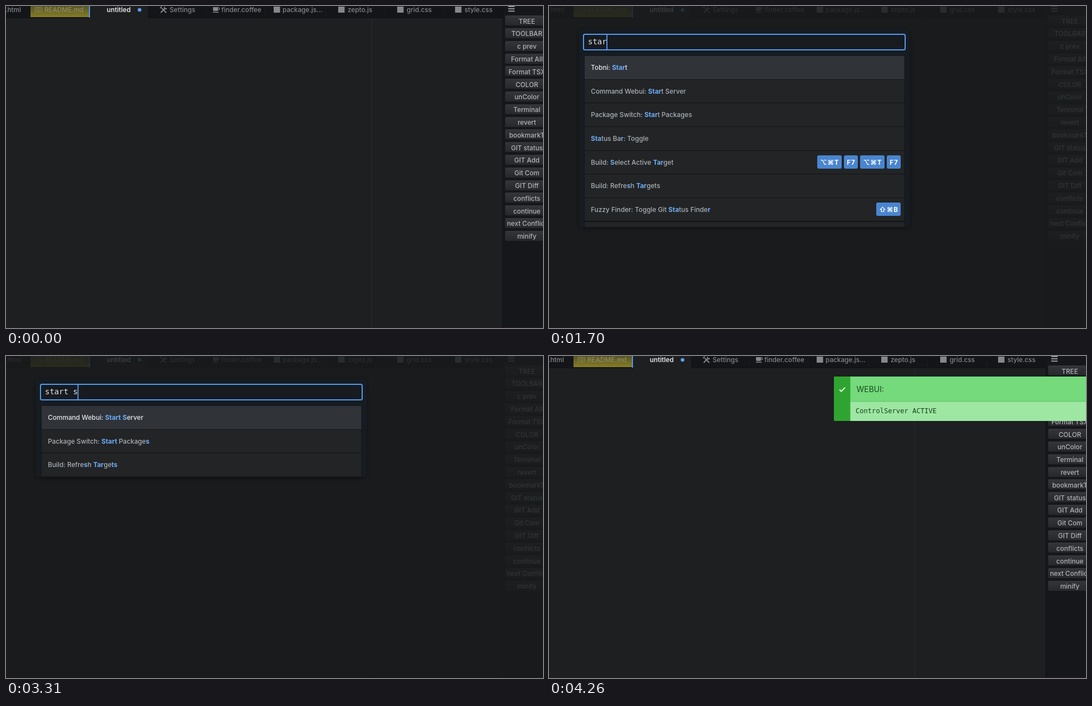
An HTML page that plays this animation: 965x580 px, repeating every 4890 ms.

```html
<!DOCTYPE html>
<html lang="en">
<head>
<meta charset="utf-8">
<title>Command palette</title>
<style>
  html, body { margin: 0; width: 100%; height: 100%; overflow: hidden; background: #1d1f21; }
  svg { position: absolute; display: block; }
  text { font: 500 11.75px Inter, "DejaVu Sans", sans-serif; white-space: pre; }
  #stage { position: relative; width: 100%; height: 100%; overflow: hidden; contain: strict; }
  #window { left: 0; top: 0; }
  #note { left: 512px; top: 37px; }
  .hit { font-weight: 700; fill: #6cadf8; }
  .key { font-weight: 700; letter-spacing: 1px; fill: #fff; }
  .query { font: 500 14px "DejaVu Sans Mono", monospace; fill: #e2e4e8; }
  .title { font: 400 14px Inter, sans-serif; fill: #1d4a21; }
  .body { font: 400 12.1px "DejaVu Sans Mono", monospace; fill: #1b3d1f; }
</style>
</head>
<body>
<div id="stage">
<svg id="window" width="965" height="580" viewBox="0 0 965 580">
  <defs>
    <linearGradient id="olive" x2="0" y2="1">
      <stop stop-color="#585424"/><stop offset="1" stop-color="#857d26"/>
    </linearGradient>
    <linearGradient id="button" x2="0" y2="1">
      <stop stop-color="#34363a"/><stop offset="1" stop-color="#26282b"/>
    </linearGradient>
    <filter id="shadow" x="-5%" y="-10%" width="110%" height="125%">
      <feDropShadow dx="0" dy="2" stdDeviation="4" flood-color="#000" flood-opacity=".4"/>
    </filter>
  </defs>
  <g id="editor"></g>
  <rect id="dim" width="965" height="580" fill="#191b1c"/>
  <g id="palette"></g>
</svg>
<svg id="note" width="463" height="80" viewBox="0 0 463 80">
  <clipPath id="round"><rect width="463" height="80" rx="3"/></clipPath>
  <g clip-path="url(#round)">
    <rect width="463" height="80" fill="#9de7a3"/>
    <rect width="463" height="45" fill="#74da7b"/>
    <rect y="44.5" width="463" height="1" fill="#66c46c"/>
    <rect width="29.5" height="80" fill="#30a430"/>
  </g>
  <path d="M10 23.5l3.3 3.3 6.7-7" fill="none" stroke="#d3f5d5" stroke-width="2"/>
  <text class="title" x="40.5" y="27.5">WEBUI:</text>
  <text class="body" x="39" y="66">ControlServer ACTIVE</text>
</svg>
</div>
<script>
const LOOP = 4890;
const $ = id => document.getElementById(id);

const rect = (x, y, w, h, fill, extra = '') =>
  `<rect x="${x}" y="${y}" width="${w}" height="${h}" fill="${fill}" ${extra}/>`;
const text = (x, y, str, attrs) => `<text x="${x}" y="${y}" ${attrs}>${str}</text>`;

// ---- editor window ----

const GREY = '#85878b';
const tabs = [
  [294, 'Settings'], [387, 'finder.coffee'], [497, 'package.js...'],
  [614, 'zepto.js'], [720, 'grid.css'], [824, 'style.css']
];
const buttons = ['TREE', 'TOOLBAR', 'c prev', 'Format All', 'Format TSX', 'COLOR',
  'unColor', 'Terminal', 'revert', 'bookmarkT', 'GIT status', 'GIT Add', 'Git Com',
  'GIT Diff', 'conflicts', 'continue', 'next Conflict', 'minify'];

function tabBar() {
  const fill = `fill="${GREY}"`;
  const line = (d, w, color = GREY) =>
    `<path d="${d}" fill="none" stroke="${color}" stroke-width="${w}"/>`;
  let out = rect(0, 0, 893, 22, '#141518') + rect(0, 21, 893, 1, '#111214');
  for (const x of [360, 465, 574, 680, 786]) out += rect(x, 0, 1, 21, '#1a1b1e');
  out += rect(44, 0, 105, 20, 'url(#olive)');
  out += rect(151, 0, 104, 22, '#1d1f21') + rect(149, 0, 2, 21, '#4f97f2');
  out += text(27, 10.8, '.html', `${fill} text-anchor="end"`);
  out += text(69, 10.8, 'README.md', 'fill="#8c8a6a"');
  out += text(181, 10.8, 'untitled', 'fill="#e4e6ea" style="font-weight:600"');
  out += '<circle cx="240" cy="7" r="3.3" fill="#5a9ff0"/>';
  for (const [x, name] of tabs) out += text(x, 10.8, name, fill);
  // book, tools, cup
  out += line('M52.5 2.5h12v8h-12zM58.5 2.5v9.5M54 5h3M54 7.5h3M60 5h3M60 7.5h3', 1, '#85825c');
  out += line('M280 4L288 12', 2) + line('M278 12L286 4', 2);
  out += line('M277 4l3-3M285 1.5v3.5h4', 1.8);
  out += `<path d="M372 2h9v5q0 2-2 2h-5q-2 0-2-2zM371 10.5h12l-1.5 1.5h-9z" ${fill}/>`;
  out += line('M381 3.2h1q1.7 0 1.7 1.7t-1.7 1.7h-1', 1.2);
  for (const x of [481, 597, 703, 807]) out += rect(x, 1, 11.5, 11, GREY);
  return out;
}

function sidebar() {
  let out = rect(893, 0, 72, 580, '#16171a') + rect(892, 0, 1, 580, '#121315');
  for (const y of [0, 4.2, 8.4]) out += rect(902.5, y, 11.5, 1.7, '#adafb3');
  buttons.forEach((name, i) => {
    const y = 17.2 + 22.8 * i;
    out += rect(897, Math.round(y), 78, 18, 'url(#button)', 'rx="2"');
    out += text(936, y + 14.3, name, 'fill="#b2b4b8" text-anchor="middle"');
  });
  return out;
}

$('editor').innerHTML = rect(0, 0, 965, 580, '#1d1f21') + rect(656.5, 22, 1, 558, '#2b2d30') +
  tabBar() + sidebar() + rect(0, 579, 965, 1, '#2a191b');

// ---- palette ----

const TOP = 90, ROW = 42.63, FULL = 308, CHAR = 8.43;
const rowTop = i => Math.round(TOP + ROW * i);

// Square brackets mark matched letters; keys follow the bar.
const idle = ['About: Clear Update State', 'About: View Release Notes',
  'Activate Power Mode: Disable', 'Activate Power Mode: Enable',
  'Activate Power Mode: Toggle|⌃⌥O', 'Application: About',
  'Application: Add Project Folder|⇧⌘O'];
const found = ['Tobni: [Start]', 'Command Webui: [Start] [Se]rver',
  'Package Switch: [Start] Package[s]', '[Sta]tus Ba[r]: [T]oggle',
  'Build: [S]elect Active [Tar]ge[t]|⌥⌘T F7 ⌥⌘T F7', 'Build: Refre[s]h [Tar]ge[ts]'];
const statusFinder = 'Fuzzy Finder: Toggle Git [Sta]tus Finde[r]|⇧⌘B';
const declaration = '[S]ymbols View: Go [T]o Decl[ar]a[t]ion|⌥⌘↓';

function results(query) {
  if (!query) return idle;
  if (query === 'start se') return [found[1]];
  if (query === 'start s') return [found[1], found[2], found[5]];
  return [...found, query.startsWith('start') ? declaration : statusFinder];
}

// Highlights only as many marked letters as have been typed.
function highlight(label, count) {
  return label.replace(/\[(.*?)\]/g, (_, run) => {
    const on = run.slice(0, count);
    count -= on.length;
    return (on && `<tspan class="hit">${on}</tspan>`) + run.slice(on.length);
  });
}

function keyBadges(keys, mid) {
  const top = Math.round(mid - 12.4);
  let right = 632, out = '';
  for (const key of keys.split(' ').reverse()) {
    const w = key.length > 2 ? 44 : 25;
    out += rect(right - w, top, w, 24, '#4a85cf', 'rx="3"');
    out += text(right - w / 2 + .5, mid + 4.2, key, 'class="key" text-anchor="middle"');
    right -= w + 4;
  }
  return out;
}

function drawPalette(query, cursor) {
  const rows = results(query);
  const typed = query.replace(' ', '').length;
  const overflows = rows.length > 6;
  const height = overflows ? FULL : rows.length * ROW;
  let out = rect(53.5, 41.5, 595, height + 57.5 - 8.5, '#191c20', 'rx="6" filter="url(#shadow)"')
    + rect(63, 89.5, 576.5, height + .5, '#131417');
  out += query
    ? rect(62, 51, 578, 28, '#171b20', 'rx="2.5" stroke="#549bee" stroke-width="2"')
    : rect(62.5, 51.5, 577, 27, '#17191d', 'rx="2" stroke="#549bee"');
  out += text(70, 69.3, query, 'class="query"');
  if (cursor) out += rect(70 + query.length * CHAR - (query ? .5 : -.3), 52, 1.8, 26, '#5aa0f5');
  rows.forEach((row, i) => {
    const [label, keys] = row.split('|');
    const top = rowTop(i), mid = TOP + ROW * i + 21;
    out += rect(64, top, 574.5, rowTop(i + 1) - top - 1, i ? '#222426' : '#303338');
    out += text(75.3, mid + 4.1, highlight(label, typed), `fill="${i ? '#adb1b6' : '#e6e8eb'}"`);
    if (keys) out += keyBadges(keys, mid);
  });
  if (overflows) out += rect(64, rowTop(7) + 1, 574.5, TOP + FULL - rowTop(7) - 1, '#222426');
  return out;
}

// ---- timeline ----

const typing = [[810, ''], [1350, 'st'], [1520, 'sta'], [1700, 'star'], [1880, 'start'],
  [3220, 'start '], [3310, 'start s'], [3580, 'start se']];
const blinks = [[2150, 2600], [2960, 3220], [3850, 4020]];
const reveal = [[0, 0], [4020, .457], [4110, .887], [4260, 1]];
const at = (steps, t) => steps.filter(s => s[0] <= t).pop()[1];

let shown = '';
function render(t) {
  const open = t >= 810 && t < 4020;
  const query = open ? at(typing, t) : '';
  const cursor = !blinks.some(([a, b]) => t >= a && t < b);
  const key = [open, query, cursor].join();
  if (key !== shown) {
    shown = key;
    $('palette').innerHTML = open ? drawPalette(query, cursor) : '';
  }
  $('dim').setAttribute('opacity', !open ? 0 : t < 930 ? .43 : .84);

  const p = at(reveal, t), rest = 1 - p;
  const note = $('note').style;
  note.opacity = p;
  note.transform = rest
    ? `perspective(550px) translate(0, ${-29.3 * rest}px) rotateX(${90 * rest}deg)` : 'none';
}

function tick() {
  render(performance.now() % LOOP);
  requestAnimationFrame(tick);
}
tick();
</script>
</body>
</html>
```
